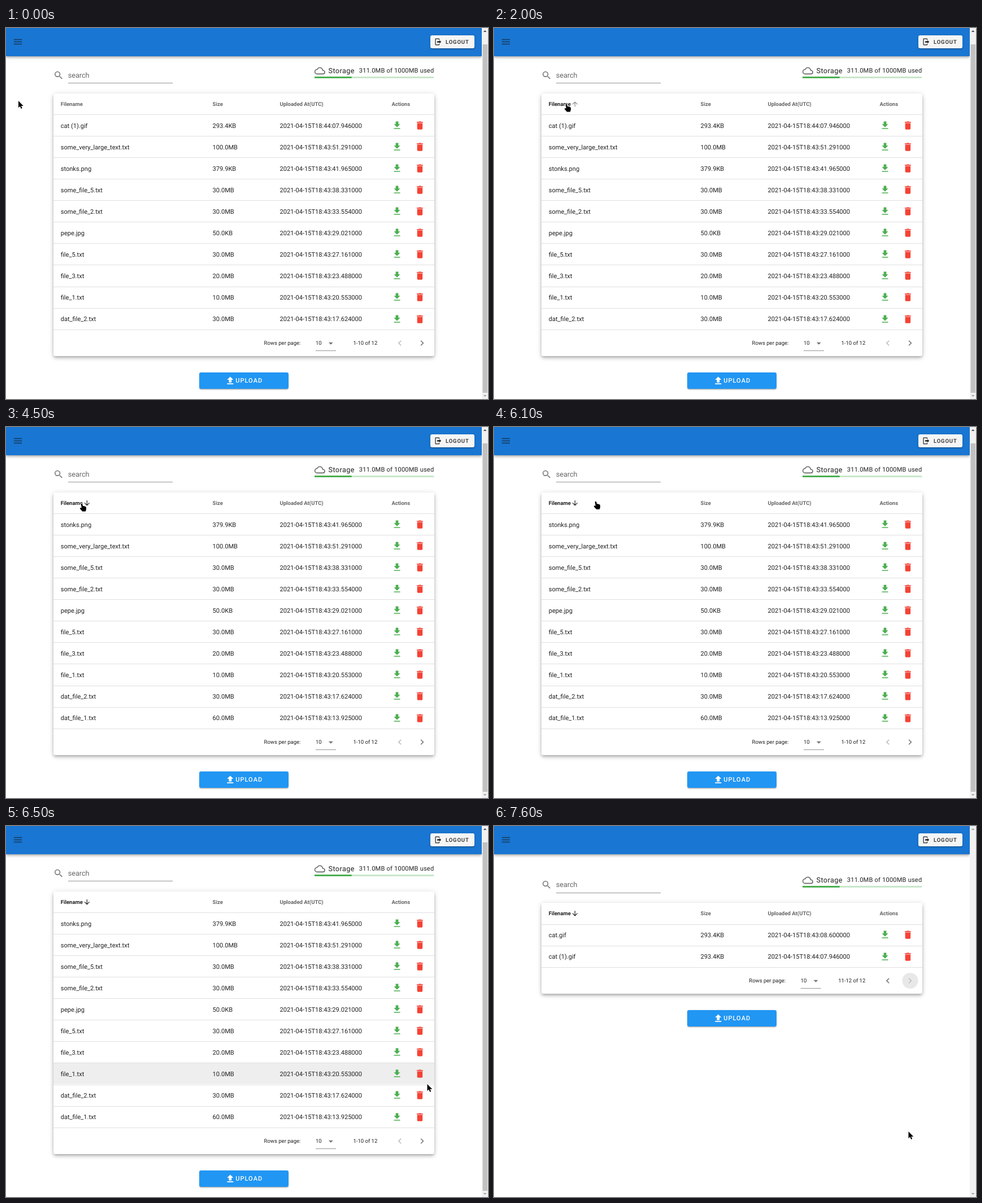
Recreate the animation shown at these times as an HTML page. Size 853 px wide and 657 px high, loop 8 s.

```html
<!DOCTYPE html>
<html lang="en">
<head>
<meta charset="utf-8">
<title>File table</title>
<style>
  html, body { margin: 0; width: 100%; height: 100%; overflow: hidden; background: #fff; }
  #stage { position: relative; width: 853px; height: 657px; overflow: hidden; }
  #stage > * { position: absolute; }
  #bar { left: 0; top: 0; width: 842px; height: 50px; background: #1976d2;
    box-shadow: 0 1.6px 3.2px -.8px #0003, 0 3.2px 4px #00000024, 0 .8px 8px #0000001f; }
  #card { left: 84px; width: 674px; background: #fff; border-radius: 3.2px;
    box-shadow: 0 2.4px 4px -.8px #0003, 0 4px 6.4px #00000024, 0 .8px 11px #0000001f; }
  .btn { border-radius: 3.2px;
    box-shadow: 0 2.4px .8px -1.6px #0003, 0 1.6px 1.6px #00000024, 0 .8px 4px #0000001f; }
  #logout { left: 751px; top: 13px; width: 78px; height: 23px; background: #f5f5f5; }
  #upload { left: 342px; width: 158px; height: 29px; background: #2196f3; }
  #scroll { left: 842px; top: 0; width: 11px; height: 657px; background: #f1f1f1; }
  svg { left: 0; top: 0; }
  text { font-family: Roboto, Arial, sans-serif; font-size: 11.08px; fill: #212121;
    white-space: pre; text-rendering: geometricPrecision; }
  .head { font-size: 9.5px; font-weight: 700; fill: #666; }
  .small { font-size: 9.5px; }
  .big { font-size: 12.66px; }
  .caps { font-weight: 500; letter-spacing: .0893em; }
</style>
</head>
<body>
<div id="stage">
  <div id="bar"></div>
  <div id="logout" class="btn"></div>
  <div id="card"></div>
  <div id="upload" class="btn"></div>
  <div id="scroll"></div>
  <svg id="art" width="853" height="657" viewBox="0 0 853 657"></svg>
</div>
<script>
const LOOP = 8000, ROW = 38.04, TOP = 154.2, ICON = 19, SCROLL = 20.3;
const INK = '#212121', GREEN = '#4caf50', RED = '#f44336';
const MUTED = '#757575', FAINT = '#bdbdbd', RULE = '#e0e0e0';
const $ = id => document.getElementById(id);

const ICONS = {
  menu: 'M3,6H21V8H3V6M3,11H21V13H3V11M3,16H21V18H3V16Z',
  logout: 'M16,17V14H9V10H16V7L21,12L16,17M14,2A2,2 0 0,1 16,4V6H14V4H5V20H14V18H16V20A2,2 0 0,1 14,22H5A2,2 0 0,1 3,20V4A2,2 0 0,1 5,2H14Z',
  search: 'M9.5,3A6.5,6.5 0 0,1 16,9.5C16,11.11 15.41,12.59 14.44,13.73L14.71,14H15.5L20.5,19L19,20.5L14,15.5V14.71L13.73,14.44C12.59,15.41 11.11,16 9.5,16A6.5,6.5 0 0,1 9.5,3M9.5,5A4.5,4.5 0 0,0 9.5,14A4.5,4.5 0 0,0 9.5,5Z',
  cloud: 'M19,18H6A4,4 0 0,1 6,10H6.71C7.37,7.69 9.5,6 12,6A5.5,5.5 0 0,1 17.5,11.5V12H19A3,3 0 0,1 19,18M19.35,10.03C18.67,6.59 15.64,4 12,4C9.11,4 6.6,5.64 5.35,8.03C2.34,8.36 0,10.9 0,14A6,6 0 0,0 6,20H19A5,5 0 0,0 24,15C24,12.36 21.95,10.22 19.35,10.03Z',
  download: 'M5,20H19V18H5M19,9H15V3H9V9H5L12,16L19,9Z',
  trash: 'M19,4H15.5L14.5,3H9.5L8.5,4H5V6H19M6,19A2,2 0 0,0 8,21H16A2,2 0 0,0 18,19V7H6V19Z',
  upload: 'M9,16V10H5L12,3L19,10H15V16H9M5,20V18H19V20H5Z',
  up: 'M13,20H11V8L5.5,13.5L4.08,12.08L12,4.16L19.92,12.08L18.5,13.5L13,8V20Z',
  caret: 'M7,10L12,15L17,10H7Z',
  left: 'M15.41,16.58L10.83,12L15.41,7.41L14,6L8,12L14,18L15.41,16.58Z',
  right: 'M8.59,16.58L13.17,12L8.59,7.41L10,6L16,12L10,18L8.59,16.58Z'
};
const ARROW = 'M0 0V12.2L2.8 9.6L4.7 14L6.7 13.1L4.8 8.9H8.7Z';
const HAND = 'M1.6 1.2Q3 -.2 4.2 1.4L5 4.8Q9.4 5 10.8 7L11 10.6L9.8 14.4H4.2L-.2 9.6Q-.4 7.8 1.4 8L2.8 8.6Z';

// Upload order, oldest first
const files = [
  ['cat.gif', '293.4KB', '43:08.600000'],
  ['dat_file_1.txt', '60.0MB', '43:13.925000'],
  ['dat_file_2.txt', '30.0MB', '43:17.624000'],
  ['file_1.txt', '10.0MB', '43:20.553000'],
  ['file_3.txt', '20.0MB', '43:23.488000'],
  ['file_5.txt', '30.0MB', '43:27.161000'],
  ['pepe.jpg', '50.0KB', '43:29.021000'],
  ['some_file_2.txt', '30.0MB', '43:33.554000'],
  ['some_file_5.txt', '30.0MB', '43:38.331000'],
  ['stonks.png', '379.9KB', '43:41.965000'],
  ['some_very_large_text.txt', '100.0MB', '43:51.291000'],
  ['cat (1).gif', '293.4KB', '44:07.946000']
];
const byName = [...files].sort((a, b) => a[0] < b[0] ? -1 : 1);
const falling = [...byName].reverse();
const pages = {
  recent: [...files].reverse().slice(0, 10),
  asc: byName.slice(0, 10),
  desc: falling.slice(0, 10),
  last: falling.slice(10)
};

// Each table lists [start ms, value]; values hold until the next start
const pageSteps = [[0, 'recent'], [2300, 'asc'], [4200, 'desc'], [7500, 'last']];
const sortSteps = [[0, 0], [1700, .2], [1900, .4], [2000, .5], [2300, .65], [2400, .9], [2600, 1]];
const turnSteps = [[0, 0], [4200, 25], [4300, 100], [4400, 160], [4500, 180]];
const discSteps = [[0, '#fff'], [6900, '#eee'], [7400, '#e8e8e8']];
const cursorSteps = [
  [0, [22, 129]], [1200, [25, 124]], [1300, [40, 114]], [1400, [64, 109.5]],
  [1500, [92, 113]], [1600, [114, 120]], [1700, [125, 130.5, 1]], [1900, [126, 132, 1]],
  [2000, [125, 134, 1]], [3600, [128.5, 131.3, 1]], [3700, [130, 133, 1]], [3800, [131, 135, 1]],
  [6100, [177, 131.3, 1]], [6200, [310, 182]], [6300, [495, 278]], [6400, [660, 378]],
  [6500, [745.5, 457]], [6600, [751, 497]], [6700, [749, 531]], [6800, [741, 549]],
  [6900, [724, 560, 1]], [7000, [727, 560, 1]], [7100, [730, 560, 1]], [7200, [732, 559.3, 1]],
  [7500, [734, 552]], [7600, [733.5, 541]]
];
const at = (steps, t) => steps.findLast(s => s[0] <= t)[1];

// Text and rules sit on whole pixels
const text = (x, y, str, attrs = '') => `<text x="${x}" y="${Math.round(y)}" ${attrs}>${str}</text>`;
const rect = (x, y, w, h, fill, attrs = '') =>
  `<rect x="${x}" y="${Math.round(y)}" width="${w}" height="${h}" fill="${fill}" ${attrs}/>`;
const icon = (name, cx, cy, fill, size = ICON, attrs = '') =>
  `<g transform="translate(${cx} ${cy}) scale(${size / 24})"><path d="${ICONS[name]}" transform="translate(-12 -12)" fill="${fill}" ${attrs}/></g>`;

function rowArt([name, size, time], top) {
  const mid = Math.round(top + 17.97) + .5, base = top + 22.5;
  return text(96.7, base, name) + text(365.6, base, size) +
    text(484.5, base, '2021-04-15T18:' + time) +
    icon('download', 692, mid, GREEN) + icon('trash', 732.4, mid, RED) +
    rect(84, top + ROW - 1, 674, 1, RULE);
}

const bodyArt = (rows, dy) =>
  icon('search', 93.1, 83.8 + dy, MUTED) +
  text(109.7, 88 + dy, 'search', 'class="big" style="fill:#666"') +
  rect(110, 97.3 + dy, 185, 1, '#949494') +
  icon('cloud', 555.3, 75.8 + dy, '#666') +
  text(570.5, 80 + dy, 'Storage', 'class="big" letter-spacing=".396"') +
  text(624.8, 78.7 + dy, '311.0MB of 1000MB used', 'letter-spacing=".198"') +
  rect(546, 85.7 + dy, 211.3, 3, '#c9e7ca') + rect(546, 85.7 + dy, 65.7, 3, GREEN) +
  text(96.7, 138 + dy, 'Filename', 'class="head" id="sortName"') +
  `<g transform="translate(143.3 ${134.8 + dy})"><g id="sortIcon">${icon('up', 0, 0, INK, 14.25)}</g></g>` +
  text(365.6, 138 + dy, 'Size', 'class="head"') +
  text(484.5, 138 + dy, 'Uploaded At(UTC)', 'class="head"') +
  text(682.4, 138 + dy, 'Actions', 'class="head"') +
  rect(84, TOP - 1 + dy, 674, 1, RULE) +
  rect(84, 0, 674, 37, '#eee', 'id="hover"') +
  rows.map((file, i) => rowArt(file, TOP + ROW * i + dy)).join('');

$('art').innerHTML =
  icon('menu', 21, 24.5, '#17395c') +
  icon('logout', 764.8, 24.5, INK, 14.25) +
  text(778, 28, 'LOGOUT', 'class="small caps"') +
  '<g id="body"></g>' +
  '<g id="foot">' +
    '<g id="perPage">' +
      text(456.6, 561, 'Rows per page:', 'class="small"') +
      text(548, 561, '10', 'class="small"') +
      icon('caret', 574.8, 558.4, MUTED) +
      rect(548, 571, 36, 1, '#949494') +
    '</g>' +
    text(657.3, 561, '', 'class="small" text-anchor="end" id="range"') +
    '<circle id="disc" cx="736.5" cy="558" r="14"/>' +
    icon('left', 697, 558, FAINT, ICON, 'id="prev"') +
    icon('right', 736.3, 558, MUTED, ICON, 'id="next"') +
    icon('upload', 396.8, 624.6, '#fff') +
    text(406.2, 628, 'UPLOAD', 'class="caps" style="fill:#fff"') +
  '</g>' +
  rect(843.6, 29, 8.4, 617, '#c1c1c1', 'id="thumb"') +
  '<path id="scrollUp" d="M844.6 7L847.6 4L850.6 7Z"/>' +
  '<path d="M844.6 650L847.6 653L850.6 650Z" fill="#a3a3a3"/>' +
  '<path id="cursor" stroke="#fff" stroke-width="1.4" paint-order="stroke" stroke-linejoin="round"/>';

const set = (id, attrs) => {
  for (const key in attrs) $(id).setAttribute(key, attrs[key]);
};

let shown;
function showPage(page) {
  if (page === shown) return;
  shown = page;
  const last = page === 'last', shift = last ? SCROLL : 0;
  const lift = Math.round(shift - (10 - pages[page].length) * ROW);
  const cardTop = Math.round(116 + shift);
  $('body').innerHTML = bodyArt(pages[page], shift);
  set('foot', { transform: `translate(0 ${lift})` });
  set('perPage', { transform: `translate(${last ? -5.3 : 0} 0)` });
  $('range').textContent = last ? '11-12 of 12' : '1-10 of 12';
  set('prev', { fill: last ? MUTED : FAINT });
  set('next', { fill: last ? FAINT : MUTED });
  set('thumb', { visibility: last ? 'hidden' : 'visible' });
  set('scrollUp', { fill: last ? '#a3a3a3' : '#505050' });
  $('card').style.top = cardTop + 'px';
  $('card').style.height = 581 + lift - cardTop + 'px';
  $('upload').style.top = 610 + lift + 'px';
}

function draw(t) {
  const page = at(pageSteps, t), sort = at(sortSteps, t);
  const [x, y, hand] = at(cursorSteps, t);
  showPage(page);

  const tone = Math.round(102 - 69 * Math.min(1, sort * 2));
  $('sortName').style.fill = `rgb(${tone},${tone},${tone})`;
  set('sortIcon', { opacity: sort, transform: `rotate(${at(turnSteps, t)})` });

  const row = Math.floor((y - TOP) / ROW);
  const over = page !== 'last' && x > 84 && x < 758 && row >= 0 && row < 10;
  set('hover', { y: Math.round(TOP + ROW * row), visibility: over ? 'visible' : 'hidden' });
  set('disc', { fill: at(discSteps, t) });
  set('cursor', { d: hand ? HAND : ARROW, transform: `translate(${x} ${y})` });
}

const start = performance.now();
function tick() {
  draw((performance.now() - start) % LOOP);
  requestAnimationFrame(tick);
}
tick();
</script>
</body>
</html>
```
